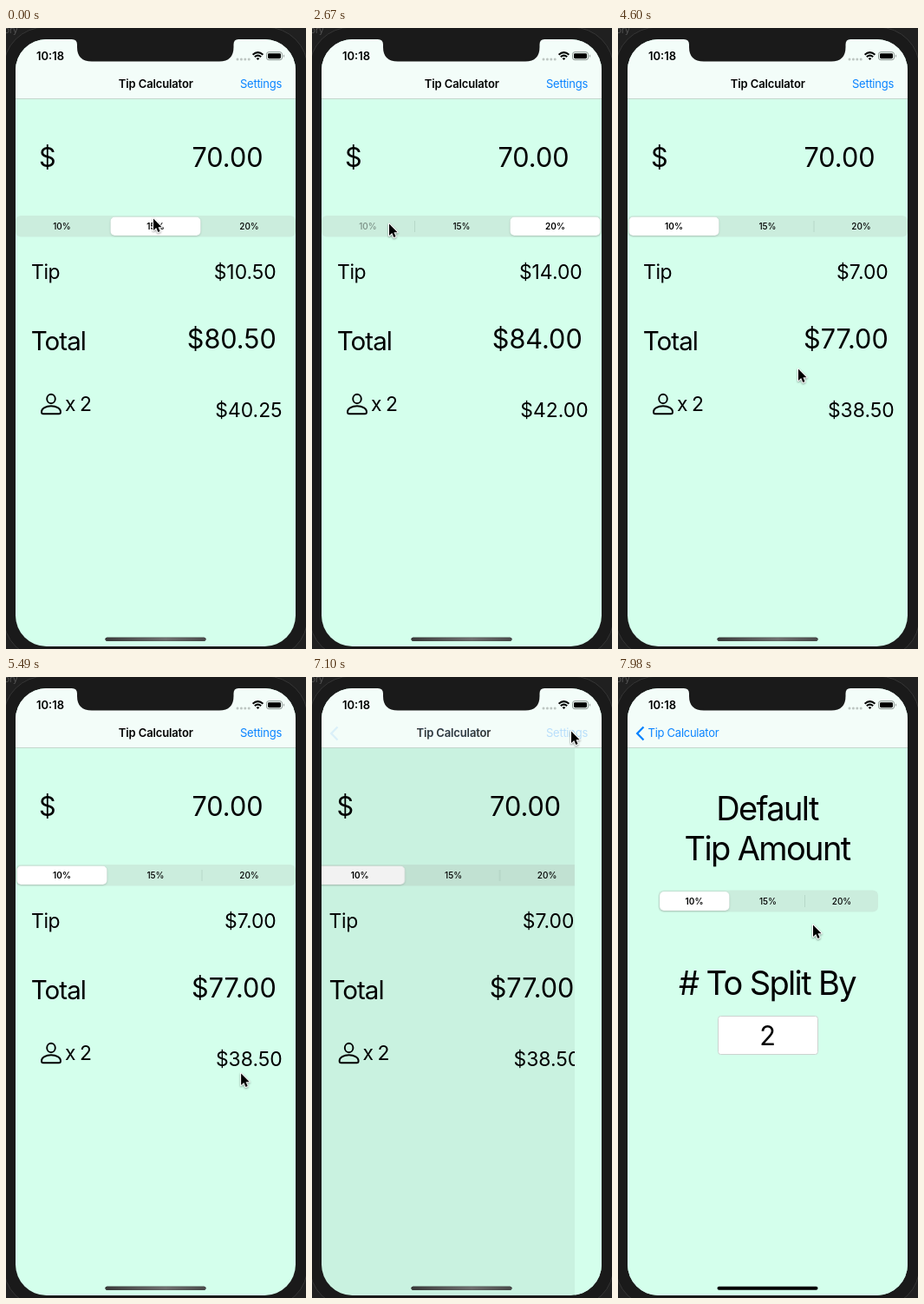
Animation of 346x715 px, one loop 8000 ms. Source, as an HTML page:

```html
<!DOCTYPE html>
<html lang="en">
<head>
<meta charset="utf-8">
<title>Tip calculator demo</title>
<style>
html, body { margin: 0; width: 100%; height: 100%; overflow: hidden; background: #1b1b1b; }
svg { display: block; width: 100vw; height: 100vh; font-family: Inter, Roboto, "Liberation Sans", sans-serif; font-optical-sizing: none; cursor: default; }

.end { text-anchor: end; }
.mid { text-anchor: middle; }
.xl { font-size: 38px; letter-spacing: -.043em; }
.lg { font-size: 30.6px; }
.md { font-size: 22.9px; }
.nav { font-size: 13px; letter-spacing: -.02em; }
.seg { font-size: 10px; font-weight: 500; text-anchor: middle; }
.blue { fill: #0a84ff; }
.thumb { fill: #fff; stroke: #000; stroke-opacity: .04; filter: drop-shadow(0 1px 1px rgba(0, 0, 0, .14)); }
.arrow { stroke: #fff; stroke-width: 2; stroke-linejoin: round; paint-order: stroke; filter: drop-shadow(0 1px .8px rgba(0, 0, 0, .4)); }

.a { animation: 8s linear infinite paused; animation-delay: calc(var(--t, 0) * -1ms); }
.step { animation-timing-function: step-end; }

#pointer { animation-name: pointer; }
@keyframes pointer {
  0% { transform: translate(169px, 218px); }
  1.85% { transform: translate(195px, 221px); }
  3.69% { transform: translate(245px, 224px); }
  5.54%, 16.62% { transform: translate(270px, 225px); }
  18.47% { transform: translate(248px, 225px); }
  22.16% { transform: translate(95px, 224px); }
  24.01%, 36.94% { transform: translate(88px, 224px); }
  40.63% { transform: translate(151px, 274px); }
  42.48% { transform: translate(240px, 285px); }
  44.32% { transform: translate(328px, 288px); }
  46.17% { transform: translate(260px, 311px); }
  49.86% { transform: translate(68px, 368px); }
  53.56% { transform: translate(312px, 372px); }
  55.4% { transform: translate(280px, 382px); }
  57.25% { transform: translate(207px, 391px); }
  60.94% { transform: translate(100px, 436px); }
  62.79% { transform: translate(37px, 457px); }
  66.49% { transform: translate(150px, 459px); }
  68.33% { transform: translate(270px, 455px); }
  70.18% { transform: translate(310px, 420px); }
  75.72% { transform: translate(299px, 126px); }
  77.57% { transform: translate(299px, 85px); }
  79.41% { transform: translate(299px, 69px); }
  83.1%, 94.18% { transform: translate(298px, 61px); }
  96.03% { transform: translate(288px, 110px); }
  97.88% { transform: translate(252px, 230px); }
  99.73%, 100% { transform: translate(224px, 284px); }
}

#pick { animation-name: pick; }
@keyframes pick {
  0%, 10% { transform: none; animation-timing-function: cubic-bezier(.3, .1, .2, 1); }
  16%, 34% { transform: translateX(108px); animation-timing-function: cubic-bezier(.3, .1, .2, 1); }
  40%, 100% { transform: translateX(-108px); }
}

#sum15 { animation-name: sum15; }
#sum20 { animation-name: sum20; }
#sum10 { animation-name: sum10; }
@keyframes sum15 { 0% { opacity: 1; } 11%, 100% { opacity: 0; } }
@keyframes sum20 { 0% { opacity: 0; } 11% { opacity: 1; } 35%, 100% { opacity: 0; } }
@keyframes sum10 { 0% { opacity: 0; } 35%, 100% { opacity: 1; } }

#opt10 { animation-name: opt10; }
#opt15 { animation-name: opt15; }
#opt20 { animation-name: opt20; }
@keyframes opt10 { 0% { opacity: 1; font-weight: 500; } 33.2% { opacity: .4; font-weight: 500; } 36.9%, 100% { opacity: 1; font-weight: 600; } }
@keyframes opt15 { 0% { font-weight: 600; } 11%, 100% { font-weight: 500; } }
@keyframes opt20 { 0% { opacity: 1; font-weight: 500; } 9.2% { opacity: .4; font-weight: 500; } 12.9% { opacity: 1; font-weight: 600; } 35%, 100% { opacity: 1; font-weight: 500; } }

#line1 { animation-name: line1; }
#line2 { animation-name: line2; }
@keyframes line1 { 0%, 13% { opacity: 0; } 16%, 34% { opacity: 1; } 36%, 100% { opacity: 0; } }
@keyframes line2 { 0%, 37% { opacity: 0; } 40%, 100% { opacity: 1; } }

#main { animation-name: leave; }
#prefs { animation-name: enter; }
#dim { animation-name: dim; }
@keyframes enter {
  0%, 86.8% { transform: translateX(323px); }
  88.64% { transform: translateX(293px); }
  90.49% { transform: translateX(53px); }
  92.34% { transform: translateX(6px); }
  94.18%, 100% { transform: none; }
}
@keyframes leave {
  0%, 86.8% { transform: none; }
  88.64% { transform: translateX(-9px); }
  90.49% { transform: translateX(-81px); }
  92.34% { transform: translateX(-95px); }
  94.18%, 100% { transform: translateX(-97px); }
}
@keyframes dim { 0%, 86.8% { opacity: 0; } 90.49%, 100% { opacity: .1; } }

#title { animation-name: title; }
#back { animation-name: back; }
#label { animation-name: label; }
#link { animation-name: link; }
#glow { animation-name: glow; }
@keyframes title { 0%, 86.8% { opacity: 1; transform: none; } 88.64% { opacity: .8; transform: translateX(-9px); } 90.49% { opacity: .1; transform: translateX(-81px); } 92.34%, 100% { opacity: 0; transform: translateX(-97px); } }
@keyframes back { 0%, 86.8% { opacity: 0; } 88.64% { opacity: .1; } 90.49% { opacity: .85; } 92.34%, 100% { opacity: 1; } }
@keyframes label { 0%, 86.8% { transform: translateX(97px); } 88.64% { transform: translateX(88px); } 90.49% { transform: translateX(16px); } 92.34%, 100% { transform: none; } }
@keyframes link { 0%, 83.1% { opacity: 1; } 84.95%, 86.8% { opacity: .3; } 88.64% { opacity: .25; } 90.49%, 100% { opacity: 0; } }
@keyframes glow { 0%, 88.64% { opacity: 1; } 92.34%, 100% { opacity: 0; } }
</style>
</head>
<body>
<svg id="stage" viewBox="0 0 346 715">
  <defs>
    <clipPath id="screen"><rect x="11" y="13" width="323" height="699" rx="35.5"/></clipPath>
    <linearGradient id="shine">
      <stop offset="0" stop-color="#3a3a3a"/>
      <stop offset=".6" stop-color="#707070"/>
      <stop offset="1" stop-color="#4a4a4a"/>
    </linearGradient>
  </defs>

  <rect width="346" height="715" fill="#202020"/>
  <text x="-2" y="6" font-size="10" fill="#555">ory</text>
  <rect x="-3" y="-1" width="351" height="727" rx="48" fill="#1a1a1a" stroke="#353535"/>

  <g clip-path="url(#screen)">
    <rect x="11" y="13" width="323" height="699" fill="#d4ffec"/>

    <g id="main" class="a">
      <text class="lg" x="38" y="160">$</text>
      <text class="lg end" x="296.5" y="160">70.00</text>

      <rect x="11" y="216" width="323" height="24.5" rx="6" fill="#cbeddd"/>
      <path id="line1" class="a" d="M118.5 222V235" stroke="#b7d8c9"/>
      <path id="line2" class="a" d="M226 222V235" stroke="#b7d8c9"/>
      <g id="pick" class="a"><rect class="thumb" x="120.5" y="217.5" width="104" height="21.5" rx="5"/></g>
      <text id="opt10" class="a step seg" x="64.5" y="232">10%</text>
      <text id="opt15" class="a step seg" x="172.5" y="232">15%</text>
      <text id="opt20" class="a step seg" x="280.5" y="232">20%</text>

      <text class="md" x="29" y="289" letter-spacing="-.4">Tip</text>
      <text x="28.8" y="370.5" font-size="29.6" letter-spacing="-1">Total</text>
      <g fill="none" stroke="#000" stroke-width="1.9">
        <ellipse cx="52" cy="427" rx="4.8" ry="5.2"/>
        <path d="M41 442C41 438 46 435.300 52 435.300S63 438 63 442Q63 444.300 61 444.300H43Q41 444.300 41 442Z"/>
      </g>
      <text class="md" x="68" y="441" word-spacing="-2">x 2</text>
      <g id="sums"></g>
      <rect id="dim" class="a" x="11" y="82" width="420" height="630"/>
    </g>

    <g id="prefs" class="a">
      <rect x="11" y="82" width="323" height="630" fill="#d4ffec"/>
      <text class="xl mid" x="172" y="164.5">Default</text>
      <text class="xl mid" x="172" y="210.5">Tip Amount</text>
      <rect x="46.5" y="245.5" width="253.5" height="25" rx="6" fill="#cbeddd"/>
      <path d="M215.5 251V265" stroke="#b7d8c9"/>
      <rect class="thumb" x="48" y="247" width="80.5" height="22" rx="5"/>
      <text class="seg" x="88" y="261.5" style="font-weight:600">10%</text>
      <text class="seg" x="173" y="261.5">15%</text>
      <text class="seg" x="258" y="261.5">20%</text>
      <text class="xl mid" x="172" y="365.5">#&#160;To Split By</text>
      <rect x="115.5" y="390.5" width="115" height="44" rx="3" fill="#fff" stroke="#cbd3cf"/>
      <text class="lg mid" x="172.5" y="423.5">2</text>
    </g>

    <rect x="11" y="13" width="323" height="68.5" fill="#f3fdf9"/>
    <path d="M11 81.5H334" stroke="#c3d6cd"/>
    <text id="title" class="a nav mid" x="172.8" y="69" font-weight="600" style="letter-spacing:-.01em">Tip Calculator</text>
    <text id="link" class="a nav blue end" x="318" y="69">Settings</text>
    <g id="back" class="a">
      <path d="M29.5 57.5L22.2 65L29.5 72.5" fill="none" stroke="#0a84ff" stroke-width="2.3"/>
      <text id="label" class="a nav blue" x="34.5" y="69">Tip Calculator</text>
    </g>

    <text x="35" y="37" font-size="13" font-weight="600">10:18</text>
    <path d="M267 36H281" stroke="#bdc6c2" stroke-width="3" stroke-linecap="round" stroke-dasharray="0 4.4"/>
    <g fill="none" stroke="#000" stroke-width="2">
      <path d="M284.6 30.8Q290.5 25.4 296.4 30.8M286.8 33.3Q290.5 30 294.2 33.3"/>
      <path d="M290.5 37L288.6 35Q290.5 33.4 292.4 35Z" fill="#000" stroke="none"/>
    </g>
    <rect x="300.5" y="27.7" width="18" height="9" rx="2.6" fill="none" stroke="#8b9490"/>
    <rect x="302" y="29.2" width="15" height="6" rx="1.4"/>
    <path d="M320 30.5Q322 32.2 320 34Z" fill="#8b9490"/>

    <rect x="114.5" y="701.8" width="116" height="4" rx="2"/>
    <rect id="glow" class="a" x="114.5" y="701.8" width="116" height="4" rx="2" fill="url(#shine)"/>
  </g>

  <path d="M76 12V13Q82 13 82 19V22Q82 38.5 99 38.5H246Q262.5 38.5 262.5 22V19Q262.5 13 268 13V12Z" fill="#1a1a1a"/>

  <g id="pointer" class="a">
    <path class="arrow" d="M1 1.5V15L4.2 12L6.4 17L8.6 16.1L6.5 11.2H10.6Z"/>
  </g>
</svg>
<script>
const stage = document.getElementById('stage');
const LOOP = 8000, STEP = 147.75, BILL = 70, PEOPLE = 2;

const amount = (size, x, y, value) =>
  `<text class="${size} end" x="${x}" y="${y}">$${value.toFixed(2)}</text>`;

document.getElementById('sums').innerHTML = [10, 15, 20].map(rate => {
  const tip = BILL * rate / 100, total = BILL + tip;
  return `<g id="sum${rate}" class="a step">` +
    amount('md', 311.8, 289, tip) +
    amount('lg', 311.7, 369, total) +
    amount('md', 318.7, 448, total / PEOPLE) + '</g>';
}).join('');

const start = performance.now();
function tick() {
  const t = (performance.now() - start) % LOOP;
  stage.style.setProperty('--t', Math.floor(t / STEP) * STEP);
  requestAnimationFrame(tick);
}
tick();
</script>
</body>
</html>
```
